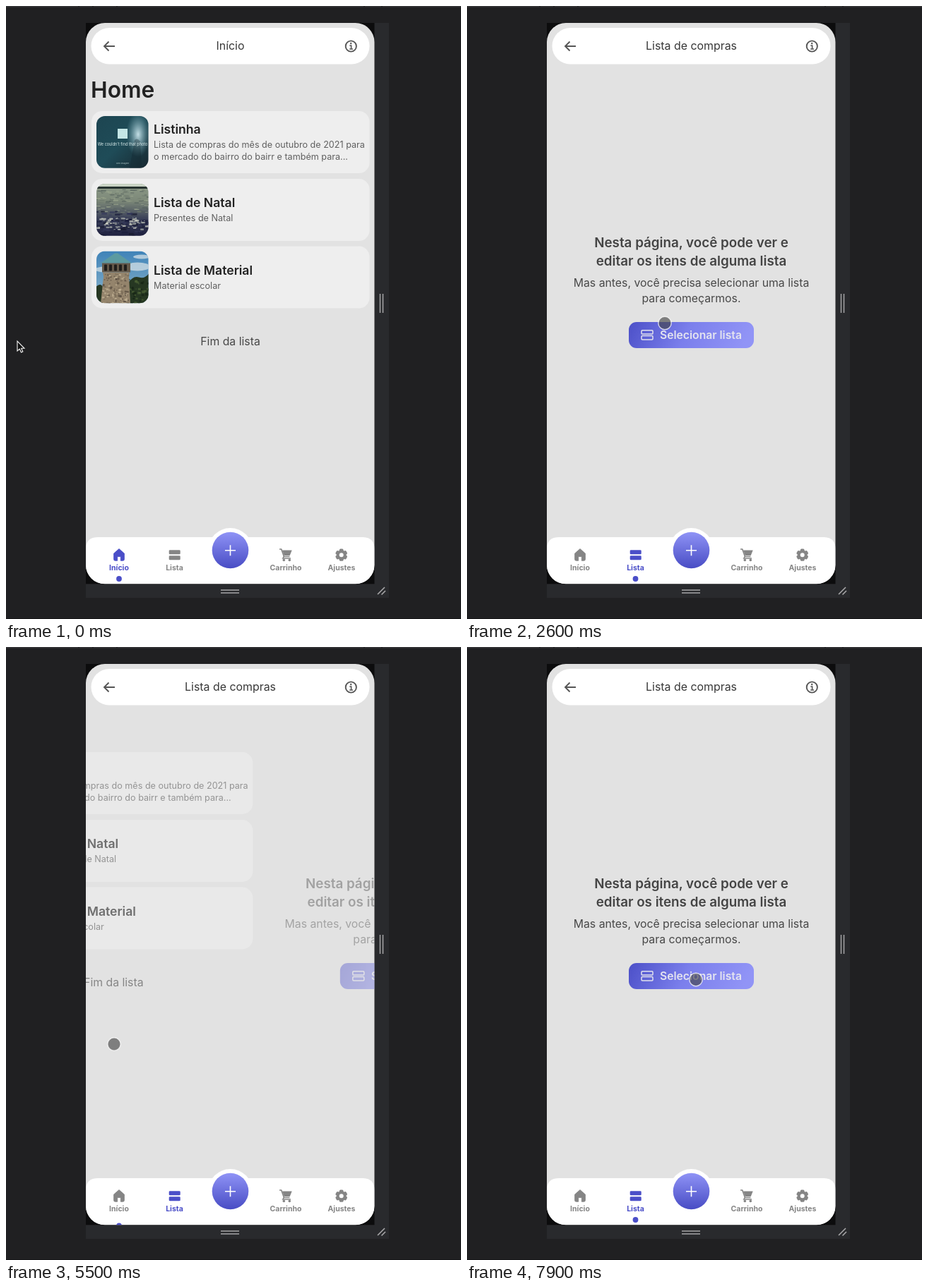
These frames come from a looping animation (644x869 px, 8 s). An HTML page:

```html
<!DOCTYPE html>
<html lang="pt">
<head>
<meta charset="utf-8">
<title>Lista de compras</title>
<style>
html, body { margin: 0; width: 100%; height: 100%; overflow: hidden; background: #202022; }
svg { display: block; width: 644px; height: 869px; font-family: Inter, "Open Sans", sans-serif; }
.title { font-weight: 600; font-size: 17.6px; fill: #222; }
.sub { font-size: 12.6px; fill: #606060; }
.body { font-size: 15.8px; fill: #484848; }
.lead { font-weight: 600; font-size: 18.8px; fill: #444; }
.mid { text-anchor: middle; }
.tab { fill: #858585; stroke: #858585; stroke-width: 0; }
.tab text { font-weight: 700; font-size: 10.5px; text-anchor: middle; }
.tab.on { fill: #4a4ec8; stroke: #4a4ec8; }
</style>
</head>
<body>
<svg id="stage" viewBox="0 0 644 869"></svg>
<script>
const stage = document.getElementById('stage');
const LOOP = 8000, STEP = 100, PAGE = 409, SLIDE = 450;
const HOME_X = 160, LIST_X = 238.5;

// Page changes alternate: home to list, list to home, ...
const slides = [890, 4292, 5304, 6150, 7092];

// Pointer stops: time, x, y
const stops = [
  [0, 16, 475], [200, 112, 480], [500, 310, 491], [800, 422, 494], [900, 420, 492],
  [1000, 181, 484], [1200, 170, 486], [1800, 426, 508], [2200, 335, 437],
  [2600, 280, 449.5], [2700, 272, 473], [2900, 290, 484], [3200, 343, 472],
  [3400, 343, 472], [4000, 162, 789], [4600, 162, 789], [5200, 425, 598],
  [5300, 405, 590], [5500, 153, 563], [6050, 145, 556], [6250, 425, 552],
  [6500, 230, 550], [6700, 137, 547], [7000, 425, 500], [7200, 150, 485],
  [7600, 340, 463], [7700, 340, 463], [7900, 324, 471.5], [8000, 324, 471.5]
];

const rect = (x, y, w, h, r, fill, more = '') =>
  `<rect x="${x}" y="${y}" width="${w}" height="${h}" rx="${r}" fill="${fill}" ${more}/>`;
const text = (x, y, cls, str) => `<text x="${x}" y="${y}" class="${cls}">${str}</text>`;
const path = (d, fill, more = '') => `<path d="${d}" fill="${fill}" ${more}/>`;
const line = (d, stroke, w) => path(d, 'none', `stroke="${stroke}" stroke-width="${w}"`);
const grad = (id, dir, ...cols) => `<linearGradient id="${id}" x1="0" y1="0" ${dir}>` +
  cols.map((c, i) => `<stop offset="${i / (cols.length - 1)}" stop-color="${c}"/>`).join('') +
  '</linearGradient>';

// Seeded flecks that give a photo its grain
function flecks(n, x, y, w, h, size, tall, colors, seed) {
  const rnd = () => (seed = (seed * 16807) % 2147483647) / 2147483647;
  let out = '';
  for (let i = 0; i < n; i++) {
    const px = x + rnd() * w, py = y + rnd() * h, s = size * (0.5 + rnd());
    out += rect(px.toFixed(1), py.toFixed(1), s.toFixed(1), (s * tall).toFixed(1), 0.5,
      colors[i % colors.length], 'opacity=".7"');
  }
  return out;
}

const notFound = rect(0, 0, 74, 74, 0, 'url(#teal)') +
  '<ellipse cx="59" cy="26" rx="17" ry="32" fill="url(#glow)"/>' +
  path('M54 34Q58 30 62 36L64 74H47Z', '#12262e', 'opacity=".35"') +
  rect(30, 18, 14, 14, 0, '#c4e6e6') +
  '<text x="37" y="41.5" class="mid" font-size="5.5" fill="#dceeee">We couldn\'t find that photo</text>' +
  '<text x="37" y="68" class="mid" font-size="3" fill="#b5cccc">sem imagem</text>';

const sea = rect(0, 0, 74, 74, 0, 'url(#sea)') +
  rect(0, 0, 74, 4, 0, '#c9d3c4') + rect(0, 4, 74, 3, 0, '#26322f') +
  flecks(130, -2, 8, 76, 32, 5, 0.2, ['#4d5a57', '#a2ad92', '#6f7b6e'], 11) +
  flecks(80, -2, 38, 76, 36, 6, 0.35, ['#1b1d3c', '#34385a', '#171a30'], 23) +
  flecks(70, 0, 46, 74, 18, 3.4, 0.5, ['#d7dbcc', '#aab0aa'], 37);

const lake = rect(0, 0, 74, 74, 0, '#eaf3f4') + rect(0, 47, 74, 27, 0, '#b9d8da') +
  path('M0 36Q5 29 12 34T26 31T40 34T55 32T74 35V48H0Z', '#4d5e45') +
  flecks(26, 0, 35, 72, 10, 4, 0.8, ['#20301f', '#e4e7df', '#76846a'], 41) +
  rect(0, 46, 74, 2, 0, '#38483a') +
  flecks(100, -2, 49, 76, 25, 4, 0.25, ['#e4f3f3', '#93bfc4'], 57);

const tower = rect(0, 0, 74, 74, 0, 'url(#sky)') +
  '<g fill="#d5e1e6" opacity=".75"><ellipse cx="58" cy="22" rx="18" ry="6"/>' +
  '<ellipse cx="12" cy="26" rx="14" ry="4"/><ellipse cx="64" cy="8" rx="12" ry="3"/></g>' +
  path('M44 46Q52 34 60 37T74 32V74H44Z', '#263722') + path('M0 50Q6 44 10 52V74H0Z', '#263722') +
  flecks(50, 46, 39, 28, 35, 3, 0.8, ['#162414', '#4b6236'], 61) +
  path('M6 17L26 3L30 3L50 17Z', '#5c9aa0') + rect(8, 17, 40, 13, 0, '#64594a') +
  [11, 18, 25, 32, 39].map(x => rect(x, 19, 4, 9, 1, '#201e1c')).join('') +
  path('M9 30H47L46 36L48 74H6L10 36Z', '#94846c') +
  flecks(150, 8, 31, 36, 43, 2.4, 0.8, ['#574c3f', '#c4b496', '#7a6b58'], 73);

const temple = rect(0, 0, 74, 74, 0, 'url(#dusk)') + rect(0, 54, 74, 20, 0, '#293f55') +
  path('M0 30L4 26L8 30L14 32L20 36L24 42V54H0Z', '#894a39') +
  path('M22 44L50 40L74 43V54H22Z', '#512a2b') +
  rect(0, 34, 20, 2, 0, '#c48d66') + rect(0, 41, 24, 2, 0, '#5a2c28') +
  flecks(36, 2, 43, 70, 9, 3, 0.5, ['#8d3e34', '#2b2027', '#bc7655'], 83) +
  flecks(60, -2, 55, 76, 19, 5, 0.25, ['#1b2d43', '#4b6074', '#5c4a4c'], 97);

const photo = (y, art, id = '', more = '') =>
  `<g transform="translate(128 ${y})" clip-path="url(#thumb)" ${id && `id="${id}"`} ${more}>${art}</g>`;
const card = y => rect(121, y, 393.5, 88, 15, '#eee');

const home =
  '<text x="120" y="130" font-size="31.7" font-weight="600" fill="#222">Home</text>' +
  card(149) + card(245) + card(340.5) +
  photo(156, notFound) +
  photo(252, sea, 'sea') + photo(252, lake, 'lake') +
  photo(347.5, tower, 'tower') + photo(347.5, temple, 'temple') +
  text(209, 181, 'title', 'Listinha') +
  text(209, 200.7, 'sub', 'Lista de compras do mês de outubro de 2021 para') +
  text(209, 218, 'sub', 'o mercado do bairro do bairr e também para...') +
  text(209, 285, 'title', 'Lista de Natal') + text(209, 305.3, 'sub', 'Presentes de Natal') +
  text(209, 380.7, 'title', 'Lista de Material') + text(209, 401, 'sub', 'Material escolar') +
  text(317.5, 481, 'body mid', 'Fim da lista');

const list =
  text(317.5, 341.5, 'lead mid', 'Nesta página, você pode ver e') +
  text(317.5, 368.3, 'lead mid', 'editar os itens de alguma lista') +
  text(317.5, 397.5, 'body mid', 'Mas antes, você precisa selecionar uma lista') +
  text(317.5, 419.7, 'body mid', 'para começarmos.') +
  rect(229, 448, 177, 37, 11, 'url(#button)') +
  rect(247, 459.7, 16, 5.4, 1.2, 'none', 'stroke="#e2e2ee" stroke-width="1.5"') +
  rect(247, 467.5, 16, 5.4, 1.2, 'none', 'stroke="#e2e2ee" stroke-width="1.5"') +
  '<text x="273" y="472" font-size="15.7" font-weight="600" fill="#e4e4ef">Selecionar lista</text>';

const homeIcon = '<path d="M160 769.5L167.4 776V784.5Q167.4 786.3 165.6 786.3H162.3V780.5H157.7V786.3H154.4Q152.6 786.3 152.6 784.5V776Z" stroke-width=".8" stroke-linejoin="round"/>';
const listIcon = '<rect x="230.7" y="771.3" width="16" height="6" rx="1.3"/><rect x="230.7" y="779.3" width="16" height="6" rx="1.3"/>';
const cartIcon = '<path d="M387 770H389.7L393.5 780.5H401.5" fill="none" stroke-width="1.7"/>' +
  '<path d="M391 771.5H404.7L401.7 779H393.8Z"/><path d="M393.5 780L391.8 783H403" fill="none" stroke-width="1.5"/>' +
  '<circle cx="393.3" cy="785.5" r="1.8"/><circle cx="401.3" cy="785.5" r="1.8"/>';
const gearIcon = '<circle cx="474.7" cy="778.2" r="5" fill="none" stroke-width="4"/>' +
  [0, 1, 2, 3, 4, 5].map(i =>
    `<rect x="471.9" y="769.6" width="5.6" height="4" rx="1.5" transform="rotate(${i * 60} 474.7 778.2)"/>`).join('');
const tab = (x, label, icon, id = '') =>
  `<g class="tab" ${id && `id="${id}"`}>${icon}${text(x, 800.3, '', label)}</g>`;

const nav =
  path('M113 770Q113 753 130 753H505Q521.5 753 521.5 770V819H113Z', '#fff') +
  '<circle cx="317.5" cy="771.5" r="31.5" fill="#fff"/>' +
  '<circle cx="317.5" cy="771.5" r="25.8" fill="url(#plus)"/>' +
  line('M310 771.7H325M317.5 764.2V779.2', '#fff', 1.6) +
  tab(HOME_X, 'Início', homeIcon, 'tabHome') + tab(LIST_X, 'Lista', listIcon, 'tabList') +
  tab(396, 'Carrinho', cartIcon) + tab(475, 'Ajustes', gearIcon) +
  '<circle id="dot" r="3.9" fill="#4a4ec8"/>';

const header =
  rect(120.5, 31, 394, 51.5, 25.7, '#fff') +
  line('M154 57H139.5M145.5 50.5L139 57L145.5 63.5', '#555', 1.9) +
  '<text id="head" x="317.5" y="62" class="mid" font-size="15.9" fill="#383838"></text>' +
  '<circle cx="488.3" cy="57" r="7.6" fill="none" stroke="#555" stroke-width="1.9"/>' +
  line('M486.3 56H488.6V61M486.2 61H491', '#555', 1.6) +
  '<circle cx="488.2" cy="53" r="1.2" fill="#555"/>';

stage.innerHTML = '<defs>' +
  '<clipPath id="screen"><rect x="113" y="24" width="408.5" height="795.3" rx="27"/></clipPath>' +
  '<clipPath id="thumb"><rect width="73.5" height="73.7" rx="12"/></clipPath>' +
  grad('plus', 'x2="0" y2="1"', '#8f93f6', '#484cc4') +
  grad('button', 'x2="1" y2=".1"', '#4c50c8', '#7b7fec', '#9194f6') +
  grad('teal', 'x2="1" y2="1"', '#1d4551', '#1f4c58', '#182830') +
  grad('sea', 'x2="0" y2="1"', '#8d9a88', '#7c8878', '#3a4058', '#1f2140') +
  grad('sky', 'x2="0" y2="1"', '#3f83b8', '#8fb6cc') +
  grad('dusk', 'x2="0" y2="1"', '#6a9cc0', '#8f9fa8', '#a98f80') +
  '<radialGradient id="glow"><stop stop-color="#c4dfe6"/>' +
  '<stop offset="1" stop-color="#6ba0ac" stop-opacity="0"/></radialGradient></defs>' +
  rect(0, 0, 644, 869, 0, '#202022') + rect(0, 0, 644, 1.5, 0, '#38383b') +
  [102, 122, 156, 506, 531].map(x => rect(x, 0, 2, 1.5, 0, '#242426')).join('') +
  rect(0, 868, 644, 1, 0, '#161618') +
  rect(113, 24, 429, 815, 0, '#292a2d') + rect(113, 24, 408.5, 795.3, 0, '#0c0c0d') +
  line('M529.5 408V435M533.5 408V435M304 828H330M304 832H330', '#a6a6a8', 1.5) +
  line('M526 834L536 824M531.5 834.5L537 829', '#a6a6a8', 1.6) +
  '<g clip-path="url(#screen)">' + rect(113, 24, 409, 796, 0, '#e2e2e2') +
  `<g id="home">${home}</g><g id="list">${list}</g>${header}${nav}</g>` +
  '<path id="arrow" d="M0 0V14L3.3 11.2L5.5 16L7.8 15L5.7 10.3H10Z" fill="#111" stroke="#f4f4f4" stroke-width="1.1"/>' +
  '<circle id="touch" r="9.2" fill="#404040" fill-opacity=".62" stroke="#fff" stroke-opacity=".75" stroke-width="1.4"/>';

const el = {};
stage.querySelectorAll('[id]').forEach(e => el[e.id] = e);
const show = (e, on) => e.setAttribute('visibility', on ? 'visible' : 'hidden');
const move = (e, x, y) => e.setAttribute('transform', `translate(${x} ${y})`);
const ease = x => x * x * (3 - 2 * x);

function pointer(t) {
  const i = stops.findIndex(s => s[0] > t);
  const [a, b] = [stops[i - 1], stops[i]], k = (t - a[0]) / (b[0] - a[0]);
  return [a[1] + (b[1] - a[1]) * k, a[2] + (b[2] - a[2]) * k];
}

function draw(t) {
  const begun = slides.filter(s => t >= s + 9).length;
  const toList = begun % 2 === 1;
  const x = begun ? Math.min(1, (t - slides[begun - 1]) / SLIDE) : 1;
  const p = toList ? ease(x) : 1 - ease(x);

  move(el.home, -PAGE * p, 0);
  move(el.list, PAGE * (1 - p), 0);
  el.home.setAttribute('opacity', 1 - p);
  el.list.setAttribute('opacity', p);

  el.head.textContent = toList ? 'Lista de compras' : 'Início';
  el.tabHome.classList.toggle('on', !toList);
  el.tabList.classList.toggle('on', toList);
  const dip = x < 0.5 ? 44 * x * x : 22 * (1 - x);
  move(el.dot, toList === x >= 0.5 ? LIST_X : HOME_X, 812 + dip);

  const later = begun > 1;
  show(el.sea, !later);
  show(el.tower, !later);
  show(el.lake, later);
  show(el.temple, later);

  const [px, py] = pointer(t), inside = px > 113;
  show(el.arrow, !inside);
  show(el.touch, inside);
  move(inside ? el.touch : el.arrow, px, py);
}

// The picture advances ten times a second
function tick() {
  draw(Math.floor(performance.now() % LOOP / STEP) * STEP);
  requestAnimationFrame(tick);
}
tick();
</script>
</body>
</html>
```
